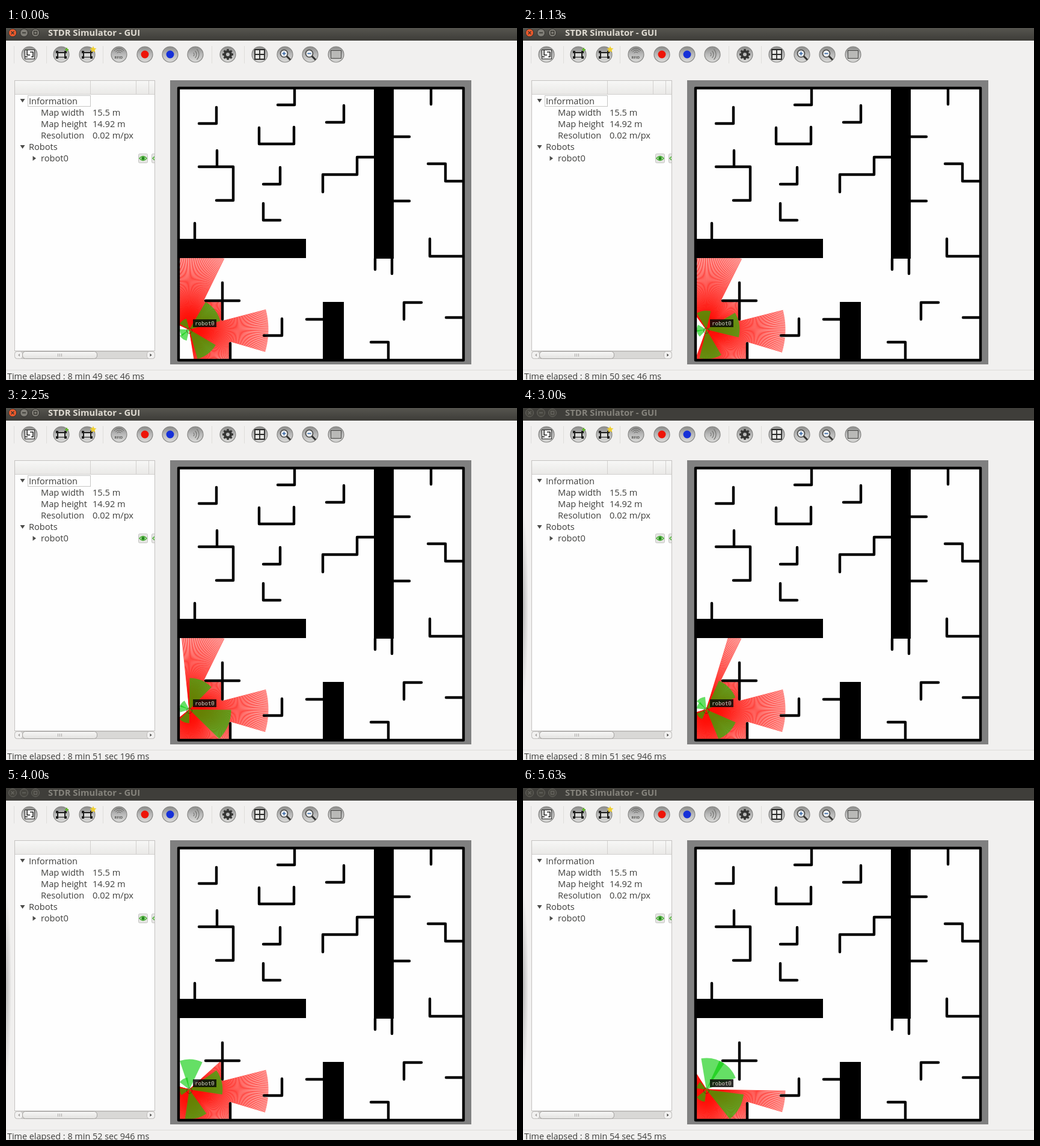
Write an HTML page with a canvas that moves like this. It is 850 px wide and 586 px high and loops after 5.76 s.

```html
<!DOCTYPE html>
<html lang="en">
<head>
<meta charset="utf-8">
<title>STDR Simulator - GUI</title>
<style>
html, body { margin: 0; width: 100%; height: 100%; overflow: hidden; background: #f1f0ef; }
canvas { display: block; }
</style>
</head>
<body>
<canvas id="stage" width="850" height="586"></canvas>
<script>
const ctx = document.getElementById('stage').getContext('2d');
const LOOP = 5760, STEP = 125, BLUR_STEP = 22;
const RAD = Math.PI / 180, TAU = Math.PI * 2;
const SANS = '"Open Sans", "Noto Sans", sans-serif';
const BG = '#f1f0ef', PAPER = '#fefefe', INK = '#3e3e3c';

// step, first laser angle in degrees, simulated ms
const KEYS = [
  [0, -156, 46], [9, -127, 1046], [18, -96, 2196], [24, -73, 2946],
  [32, -42, 3946], [38, -20, 4698], [45, 1, 5545]
];

const ROBOT = { x: 305, y: 502 };
const LASER = { span: 237, rays: 340, range: 131.5 };
const SONAR = { half: 22, range: 92, mounts: [0, 90, -90, 163, -163] };

// thin walls as polylines, thick ones as boxes
const LINES = `321,159 350,159 350,132|452,128 480,128 480,101|421,166 421,193 479,193 479,165
|533,157 562,157 562,129|351,204 351,231|321,231 378,231 378,287 350,287|428,260 456,260 456,232
|428,292 428,320 456,320|527,273 527,244 584,244 584,215 612,215|314,325 314,351|707,101 707,127
|645,181 671,181|702,226 731,226 731,255 760,255|645,288 671,288|705,351 705,380 760,380
|614,384 614,402|642,384 642,409|360,424 360,485|332,454 388,454|429,512 459,512 459,484
|500,485 527,485|607,523 636,523 636,552|662,485 662,457 691,457|732,482 760,482|373,552 373,525
|287,100 761,100 761,553 287,553 287,100`
  .split('|').map(l => l.trim().split(' ').map(p => p.split(',').map(Number)));
const BLOCKS = [[288, 351, 499, 383], [612, 101, 645, 384], [527, 456, 562, 553]];

const boxes = BLOCKS.slice();
for (const line of LINES)
  for (let i = 1; i < line.length; i++) {
    const [a, b] = line.slice(i - 1, i + 1);
    boxes.push([Math.min(a[0], b[0]) - 2, Math.min(a[1], b[1]) - 2,
                Math.max(a[0], b[0]) + 2, Math.max(a[1], b[1]) + 2]);
  }

// distance from the robot to the nearest wall
function cast(deg, range) {
  const dx = Math.cos(deg * RAD) || 1e-9, dy = Math.sin(deg * RAD) || 1e-9;
  let best = range;
  for (const [x0, y0, x1, y1] of boxes) {
    const ax = (x0 - ROBOT.x) / dx, bx = (x1 - ROBOT.x) / dx;
    const ay = (y0 - ROBOT.y) / dy, by = (y1 - ROBOT.y) / dy;
    const near = Math.max(Math.min(ax, bx), Math.min(ay, by));
    const far = Math.min(Math.max(ax, bx), Math.max(ay, by));
    if (near > 0 && near <= far && near < best) best = near;
  }
  return best;
}

function rect(x, y, w, h, fill, stroke) {
  if (fill) { ctx.fillStyle = fill; ctx.fillRect(x, y, w, h); }
  if (stroke) {
    ctx.strokeStyle = stroke; ctx.lineWidth = 1;
    ctx.strokeRect(x + .5, y + .5, w - 1, h - 1);
  }
}
function pill(x, y, w, h, r, fill, stroke) {
  ctx.beginPath(); ctx.roundRect(x, y, w, h, r);
  paint(fill, stroke);
}
function disc(x, y, r, fill, stroke, width) {
  ctx.beginPath(); ctx.arc(x, y, r, 0, TAU);
  paint(fill, stroke, width);
}
function shape(d, fill, stroke, width) {
  const p = new Path2D(d);
  if (fill) { ctx.fillStyle = fill; ctx.fill(p); }
  if (stroke) { ctx.strokeStyle = stroke; ctx.lineWidth = width || 1; ctx.stroke(p); }
}
function paint(fill, stroke, width = 1) {
  if (fill) { ctx.fillStyle = fill; ctx.fill(); }
  if (stroke) { ctx.strokeStyle = stroke; ctx.lineWidth = width; ctx.stroke(); }
}
function text(s, x, y, color = INK, font = '14.6px ' + SANS) {
  ctx.font = font; ctx.fillStyle = color; ctx.fillText(s, x, y);
}
function ramp(y0, y1, ...colors) {
  const g = ctx.createLinearGradient(0, y0, 0, y1);
  colors.forEach((c, i) => g.addColorStop(i / (colors.length - 1), c));
  return g;
}

function titleBar(active) {
  rect(0, 0, 850, 21, active ? ramp(0, 21, '#56554f', '#3d3c38') : '#3f3e3a');
  const edge = active ? '#2e2d2a' : '#66655f';
  const glyph = active ? '#35342f' : '#66655f';
  [11, 30, 49].forEach((x, i) =>
    disc(x, 8, 6.5, active ? (i ? '#807e77' : '#ee5a2c') : '#46453f', edge));
  shape('M8.5 5.5l5 5m0-5l-5 5M27 8h6M46.5 5.5h5v5h-5z', null, glyph, 1.3);
  text('STDR Simulator - GUI', 70, 13, active ? '#dfdbd2' : '#85837c', 'bold 14.8px ' + SANS);
}

function robotIcon() {
  shape('M-9-6h4v2h10v-2h4v4h-2v5h2v4h-4v-2h-10v2h-4v-4h2v-5h-2z', '#1d1d1c');
  rect(-5, -2, 10, 6, '#d8d8d6');
}
function lens(plus) {
  disc(-1.5, -1.5, 6, '#eef0f2', '#444442', 1.6);
  shape('M3 3l6 6', null, '#333331', 3);
  shape('M-4.5-1.5h6' + (plus ? 'm-3-3v6' : ''), null, '#3465a4', 1.7);
}
const ICONS = [
  [39, () => { rect(-8, -8, 17, 16, '#fafafa', '#222221'); shape('M-4-8v9h5M-8 4h5M1-4h5v8h-3', null, '#222221', 1.6); }],
  [92, () => { robotIcon(); shape('M9-11v6M6-8h6', null, '#63b52c', 2); }],
  [135, () => { robotIcon(); shape('M10-14l1.5 3.5 4 .5-3 2.5 1 4-3.5-2-3.5 2 1-4-3-2.5 4-.5z', '#f0d02c'); }],
  [188, () => {
    ctx.beginPath();
    for (const r of [4, 7, 10]) { ctx.moveTo(-r * .8, -r * .6); ctx.arc(0, 0, r, Math.PI * 1.2, Math.PI * 1.8); }
    paint(null, '#666664', 1);
    text('RFID', -7.5, 7, '#555553', 'bold 6px ' + SANS);
  }],
  [231, () => disc(0, 0, 6.5, '#ee1408')],
  [273, () => disc(0, 0, 6.5, '#1530d8')],
  [315, () => {
    for (const r of [4, 8, 12]) { ctx.beginPath(); ctx.arc(-6, 0, r, -.8, .8); paint(null, '#777775', 1.3); }
  }],
  [369, () => {
    for (let i = 0; i < 8; i++) { ctx.rotate(TAU / 8); rect(-1.7, -9, 3.4, 5, '#353534'); }
    disc(0, 0, 5, null, '#353534', 4);
  }],
  [422, () => { rect(-8, -8, 16, 16, '#e8e8e6'); shape('M-8-8h16v16h-16zM0-8v16M-8 0h16', null, '#2a2a29', 1.8); }],
  [464, () => lens(true)],
  [506, () => lens(false)],
  [549, () => rect(-9, -7, 18, 14, '#b9b9b7', '#444442')]
];

function toolbar() {
  for (const x of [13, 67, 161, 342, 396]) rect(x, 30, 1, 29, '#dedddb');
  for (const [x, draw] of ICONS) {
    ctx.save();
    ctx.translate(x, 44);
    disc(0, 0, 13, ramp(-13, 13, '#8c8c8a', '#bababa', '#dadad8'), '#858583', 1.2);
    draw();
    ctx.restore();
  }
}

function eye(x) {
  pill(x - 7.5, 209.5, 15, 15, 2, '#e6e6e4', '#c4c4c2');
  shape(`M${x - 6} 217q6-7 12 0q-6 7-12 0z`, '#d8f2cc', '#4cae38', 1.4);
  disc(x, 217, 2.8, '#238a1c');
}

function tree(active) {
  rect(14, 87, 234, 464, BG);
  rect(14, 87, 234, 451, PAPER, '#c4c2c0');
  rect(15, 88, 232, 23, ramp(88, 111, '#f7f7f6', '#e9e8e6'));
  rect(15, 110, 232, 1, '#d2d0ce');
  for (const x of [140, 216, 237]) rect(x, 88, 1, 22, '#d2d0ce');
  if (active) {
    ctx.setLineDash([1, 1]);
    rect(36, 112, 105, 19, null, '#8c8c8a');
    ctx.setLineDash([]);
  }
  shape('M23.500 118h8l-4 6zM23.500 195h8l-4 6zM44.5 213v8l5.500-4z', '#4c4c4a');
  text('Information', 38, 127);
  [['Map width', '15.5 m'], ['Map height', '14.92 m'], ['Resolution', '0.02 m/px']]
    .forEach(([k, v], i) => { text(k, 58, 146 + 19 * i); text(v, 144, 146 + 19 * i); });
  text('Robots', 38, 203);
  text('robot0', 58, 222);
  ctx.save();
  ctx.beginPath(); ctx.rect(15, 111, 232, 425); ctx.clip();
  eye(228); eye(250);
  ctx.restore();

  pill(14.5, 538.5, 233, 12, 4, '#d9d8d6', '#bebcba');
  pill(14.5, 538.5, 13, 12, 4, '#f2f1f0', '#bebcba');
  pill(234.5, 538.5, 13, 12, 4, '#f2f1f0', '#bebcba');
  pill(27.5, 538.5, 124, 12, 5, ramp(538, 550, '#f8f8f7', '#e4e3e1'), '#a09e9c');
  for (const x of [86, 89, 92]) rect(x, 542, 1, 5, '#a8a6a4');
  shape('M23 542v5l-3-2.500z', '#a8a6a4');
  shape('M239.500 542v5l3-2.500z', '#444442');
}

function walls() {
  ctx.strokeStyle = ctx.fillStyle = '#000';
  ctx.lineWidth = 4.4;
  ctx.lineCap = ctx.lineJoin = 'round';
  ctx.beginPath();
  for (const line of LINES) line.forEach(([x, y], i) => i ? ctx.lineTo(x, y) : ctx.moveTo(x, y));
  ctx.stroke();
  ctx.lineCap = 'butt'; ctx.lineJoin = 'miter';
  for (const [x0, y0, x1, y1] of BLOCKS) ctx.fillRect(x0, y0, x1 - x0, y1 - y0);
}

function laser(start) {
  ctx.strokeStyle = 'rgba(255,16,8,.78)';
  ctx.lineWidth = 1;
  for (let i = 0; i <= LASER.rays; i++) {
    const deg = start + LASER.span * i / LASER.rays, d = cast(deg, LASER.range);
    ctx.beginPath();
    ctx.moveTo(ROBOT.x, ROBOT.y);
    ctx.lineTo(ROBOT.x + d * Math.cos(deg * RAD), ROBOT.y + d * Math.sin(deg * RAD));
    ctx.stroke();
  }
}

function sonars(heading) {
  ctx.fillStyle = 'rgba(0,204,0,.6)';
  for (const mount of SONAR.mounts) {
    const mid = heading + mount;
    let r = SONAR.range;
    for (let a = -SONAR.half; a <= SONAR.half; a++) r = Math.min(r, cast(mid + a, r));
    ctx.beginPath();
    ctx.moveTo(ROBOT.x, ROBOT.y);
    ctx.arc(ROBOT.x, ROBOT.y, r, (mid - SONAR.half) * RAD, (mid + SONAR.half) * RAD);
    ctx.fill();
  }
}

function map(start) {
  rect(273, 87, 501, 473, '#808080');
  rect(287, 100, 474, 453, PAPER);
  laser(start);
  sonars(start + LASER.span / 2);
  walls();
  disc(ROBOT.x, ROBOT.y + 2, 4.5, null, 'rgba(90,20,10,.6)');
  rect(311, 485, 39, 13, 'rgba(10,10,8,.85)');
  text('robot0', 314, 495, '#d4d4c4', '9.1px "DejaVu Sans Mono", monospace');
}

function status(ms) {
  rect(0, 569, 850, 1, '#dddbd9');
  const s = 49 + Math.floor(ms / 1000);
  text(`Time elapsed : 8 min ${s} sec ${ms % 1000} ms`, 2, 585, INK, '14.4px ' + SANS);
}

function sideShadow() {
  ctx.save();
  ctx.translate(0, 330);
  ctx.scale(9, 155);
  const g = ctx.createRadialGradient(0, 0, 0, 0, 0, 1);
  g.addColorStop(0, 'rgba(80,80,80,.35)');
  g.addColorStop(1, 'rgba(80,80,80,0)');
  disc(0, 0, 1, g);
  ctx.restore();
}

function pose(step) {
  const i = Math.max(1, KEYS.findIndex(k => k[0] >= step));
  const [a, b] = [KEYS[i - 1], KEYS[i]];
  const f = (step - a[0]) / (b[0] - a[0]);
  return {
    start: a[1] + (b[1] - a[1]) * f,
    ms: f === 1 ? b[2] : a[2] + Math.floor((b[2] - a[2]) * f / 50) * 50
  };
}

function render(step) {
  const { start, ms } = pose(step), active = step < BLUR_STEP;
  rect(0, 0, 850, 586, BG);
  titleBar(active);
  toolbar();
  tree(active);
  map(start);
  status(ms);
  if (!active) sideShadow();
}

// steps start on multiples of 125 ms rounded to whole hundredths of a second
function stepAt(t) {
  return Math.min(45, Math.floor((Math.floor(t / 10) * 10 + 0.01) / STEP));
}

const began = performance.now();
let shown = -1;
function tick(now) {
  const step = stepAt(Math.max(0, now - began) % LOOP);
  if (step !== shown) render(shown = step);
  requestAnimationFrame(tick);
}
render(shown = 0);
requestAnimationFrame(tick);
</script>
</body>
</html>
```
